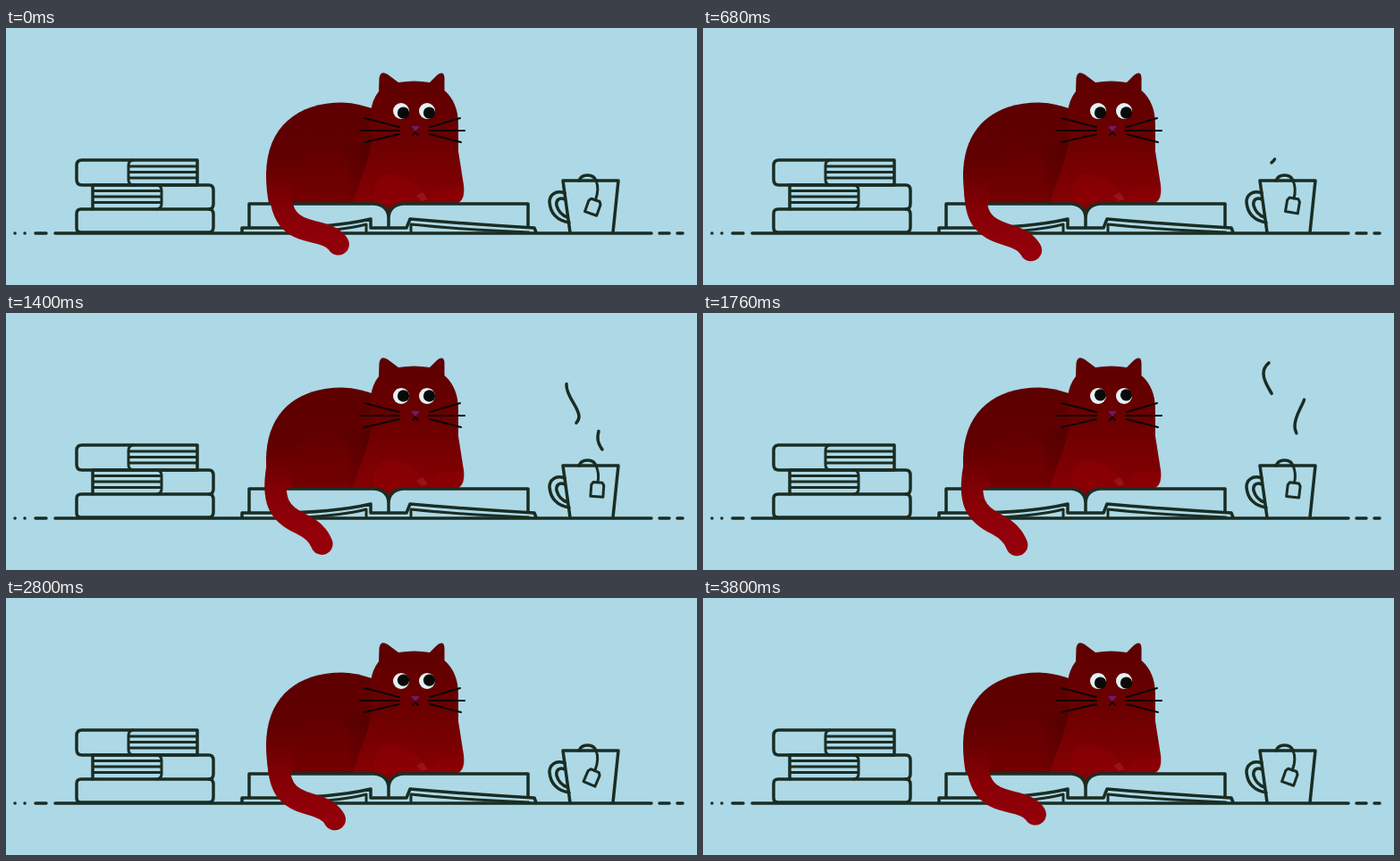
These frames come from a looping animation (773 px wide and 288 px high, 4 s). An HTML page:

```html
<!DOCTYPE html>
<html lang="en">
<head>
<meta charset="utf-8">
<title>Cat on a book</title>
<style>
html, body { margin: 0; height: 100%; overflow: hidden; background: #add8e6; }
svg { display: block; width: 773px; height: 288px; }
.ink { fill: none; stroke: #1a2d23; stroke-width: 3.5; stroke-linecap: round; stroke-linejoin: round; }
.thin { stroke-width: 3; }
</style>
</head>
<body>
<svg viewBox="0 0 773 288">
  <defs>
    <linearGradient id="bodyFill" gradientUnits="userSpaceOnUse" x1="0" y1="84" x2="0" y2="197">
      <stop offset="0" stop-color="#5e0000"/>
      <stop offset=".5" stop-color="#600000"/>
      <stop offset="1" stop-color="#780002"/>
    </linearGradient>
    <linearGradient id="shade" gradientUnits="userSpaceOnUse" x1="376" y1="0" x2="412" y2="0">
      <stop offset="0" stop-color="#500000" stop-opacity="0"/>
      <stop offset="1" stop-color="#500000" stop-opacity=".7"/>
    </linearGradient>
    <linearGradient id="thighFill" gradientUnits="userSpaceOnUse" x1="0" y1="125" x2="0" y2="197">
      <stop offset="0" stop-color="#600000"/>
      <stop offset="1" stop-color="#740000"/>
    </linearGradient>
    <linearGradient id="frontFill" gradientUnits="userSpaceOnUse" x1="0" y1="52" x2="0" y2="197">
      <stop offset="0" stop-color="#5e0000"/>
      <stop offset=".5" stop-color="#6c0000"/>
      <stop offset="1" stop-color="#860003"/>
    </linearGradient>
    <linearGradient id="tailFill" gradientUnits="userSpaceOnUse" x1="0" y1="160" x2="0" y2="250">
      <stop offset="0" stop-color="#680000"/>
      <stop offset=".5" stop-color="#860006"/>
      <stop offset="1" stop-color="#94000a"/>
    </linearGradient>
  </defs>

  <!-- ground and stacked books -->
  <g class="ink">
    <path d="M10 230h.1M21 230h.1M33 230h12M55 230H722M731 230h11M751 230h6"/>
    <path d="M84 203H227Q232 203 232 209V223Q232 229 227 229H84Q79 229 79 224V208Q79 203 84 203Z"/>
    <path d="M97 203V176H227Q232 176 232 182V197Q232 203 227 203"/>
    <path d="M214 148V176H85Q79 176 79 170V154Q79 148 85 148Z"/>
    <path class="thin" d="M169 176Q174 177 174 182V197Q174 202 169 203M98 182.500H173M98 189H173M98 195.500H173"/>
    <path class="thin" d="M142 148Q137 149 137 154V170Q137 175 142 176M138 155H213M138 161.500H213M138 168H213"/>
  </g>

  <!-- cup -->
  <g class="ink">
    <path d="M623 171H685L679 229M623 171L631 229"/>
    <path d="M625 185C614 181 608 188 608 195C609 208 617 216 630 218"/>
    <path d="M625 192C619 189 615 193 616 199C618 206 622 210 628 212"/>
    <path d="M641 171C644 163 657 163 660 171"/>
    <path id="string" class="thin"/>
    <path id="tag" class="thin" d="M-5 0H5L7 3V16H-7V3Z"/>
    <path id="steamA" pathLength="1" d="M636 112Q641 108 641 103C641 93 627 81 627 68Q627 61 633 56"/>
    <path id="steamB" pathLength="1" d="M667 140Q662 133 662 127C662 112 674 102 674 89Q674 83 670 79"/>
  </g>

  <!-- cat -->
  <path fill="url(#bodyFill)" d="M294 197Q291 180 291 165C291 110 327 83.500 376 83.500Q396 84 420 94V197Z"/>
  <path fill="url(#shade)" d="M376 128Q398 132 412 126V196H376Z"/>
  <path fill="url(#thighFill)" d="M340 130C366 122 383 138 383 162C383 177 380 188 374 196H320Q326 150 340 130Z"/>
  <path fill="url(#frontFill)" d="M408 95Q409 81 417 71L417.500 56Q419 47 427 52L439 61Q457 58 474 61L482 53Q490 47 490.500 56V70C501 79 506 92 506 108V138L512 176Q514 197 500 197H440Q428 199 428 213Q428 199 412 197H388C394 172 404 158 409 128Z"/>
  <g fill="#98000a" opacity=".35">
    <path d="M412 196Q409 165 430 164Q456 169 470 188L466 196Z"/>
    <path d="M474 196Q476 180 492 178H512Q515 196 501 197Z"/>
  </g>
  <path fill="#b04050" opacity=".3" d="M459 188L466 184L472 192L465 194Z"/>

  <!-- open book -->
  <g class="ink">
    <path d="M272 223V197H412Q428 199 428 213Q428 199 444 197H584V223M428 213V222"/>
    <path d="M264 229V224H300Q365 224 408 214V224H448L452 214Q520 220 591 224L593 229"/>
    <path class="thin" d="M330 229Q375 227 403 220V229M453 229V220Q510 226 585 229"/>
  </g>

  <path id="tail" fill="none" stroke="url(#tailFill)" stroke-width="24.500" stroke-linecap="round"/>
  <path fill="url(#tailFill)" d="M291 160H317L320 196L303 200Q292 192 291 160Z"/>

  <!-- face -->
  <g fill="#e2f2f4"><circle cx="442" cy="93" r="9"/><circle cx="471" cy="93" r="9"/></g>
  <g id="pupils" fill="#080a0a"><circle cx="444.500" r="6.600"/><circle cx="473.500" r="6.600"/></g>
  <path fill="none" stroke="#0c0606" stroke-width="2" stroke-linecap="round" d="M401 101L440 111M396 115H440M401 128L440 119M474 111L508 101M473 115H513M474 119L509 128"/>
  <path fill="none" stroke="#180008" stroke-width="1.800" stroke-linecap="round" d="M458 114V117L455 120M458 117L461 120"/>
  <path fill="#6c1b70" d="M453 110H463L458 116Z"/>
</svg>
<script>
const LOOP = 4000, START = 120, END = 3800;
const el = id => document.getElementById(id);
const clamp = (v, lo, hi) => Math.min(hi, Math.max(lo, v));
const ramp = (t, from, to) => clamp((t - from) / (to - from), 0, 1);
const wave = (t, peak) => Math.cos(2 * Math.PI * (t - peak) / (END - START));

function drawTail(t) {
  const q = 0.5 + 0.5 * wave(t, 1710);
  const bump = 14 * q * (1 - q);
  const at = (x0, y0, x1, y1, k = 0) =>
    `${x0 + (x1 - x0) * q + bump * k} ${y0 + (y1 - y0) * q}`;
  el("tail").setAttribute("d",
    `M305 165C${at(306, 215, 294, 212)} ${at(320, 223, 306, 226)} ${at(345, 228, 329, 237, 0.5)}` +
    `Q${at(366, 232, 346, 246, 1)} ${at(372, 241.5, 351, 260, 1)}`);
}

function drawTag(t) {
  const angle = 14.5 + 10.5 * wave(t, 3160);
  const x = 662.7 - 0.17 * angle, y = 189 + 0.2 * angle;
  el("string").setAttribute("d", `M660 171Q664 180 ${x} ${y}`);
  el("tag").setAttribute("transform", `translate(${x} ${y}) rotate(${angle})`);
}

// A dash runs up the curve while the curve itself drifts upwards.
function drawSteam(id, t, headFrom, headTo, tailFrom, tailTo) {
  const path = el(id);
  const head = ramp(t, headFrom, headTo), tail = ramp(t, tailFrom, tailTo);
  path.style.display = head > tail ? "" : "none";
  path.setAttribute("stroke-dasharray", `${head - tail} 2`);
  path.setAttribute("stroke-dashoffset", -tail);
  path.setAttribute("transform", `translate(0 ${(1760 - t) * 0.036})`);
}

function frame(now) {
  const t = clamp(now % LOOP, START, END);
  drawTail(t);
  drawTag(t);
  drawSteam("steamA", t, 600, 1600, 1360, 2380);
  drawSteam("steamB", t, 1080, 2050, 1670, 2650);
  el("pupils").setAttribute("transform", `translate(0 ${93.2 + 2 * wave(t, 400)})`);
  requestAnimationFrame(frame);
}
frame(0);
</script>
</body>
</html>
```
